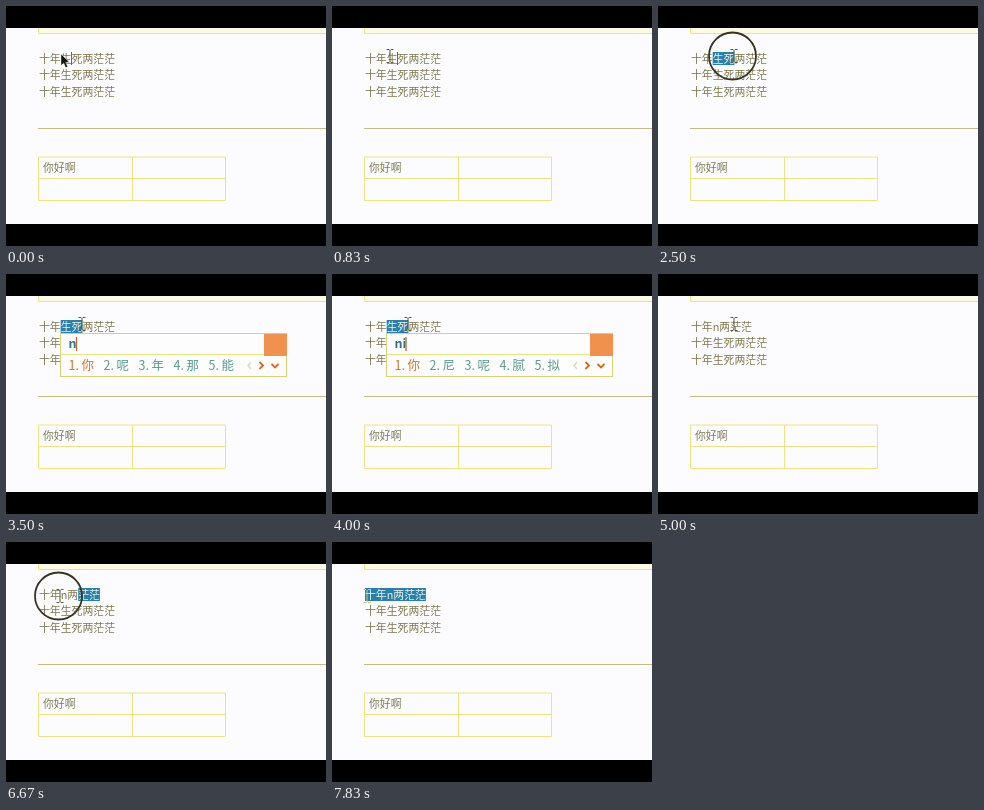
Animation, 320 px wide and 240 px high, one loop 8 s. Source, as an HTML page:

```html
<!DOCTYPE html>
<html lang="zh">
<head>
<meta charset="utf-8">
<title>Text editing</title>
<style>
  html, body { margin: 0; width: 100%; height: 100%; overflow: hidden; background: #000; }
  svg { display: block; width: 100vw; height: 100vh; }
  text { font-family: "Noto Sans CJK SC", "Noto Sans CJK", sans-serif; white-space: pre; }
  .body text { font-size: 10.86px; font-weight: 500; fill: #7d7a50; }
  .rule { fill: none; stroke: #e9e681; }
  .pick { font-size: 12.5px; font-weight: 500; fill: #5a998f; }
  .pick:first-child { fill: #d3702c; }
</style>
</head>
<body>
<svg viewBox="0 0 320 240">
  <defs>
    <clipPath id="selClip"><rect id="clipBox" y="46" height="13"/></clipPath>
  </defs>
  <rect width="320" height="240"/>
  <rect y="22" width="320" height="196" fill="#fcfcfe"/>

  <rect x="32" y="22" width="288" height="5" fill="#fbfae3"/>
  <path class="rule" d="M32.5 22V27.5H320"/>
  <path d="M32 122.5H320" stroke="#bfbe84"/>
  <path class="rule" d="M32.5 151H219.5V194.5H32.5ZM32.5 172.5H219.5M126.5 151V194.5"/>

  <g class="body">
    <text id="line" x="33" y="56.5"></text>
    <text x="33" y="73">十年生死两茫茫</text>
    <text x="33" y="89.5">十年生死两茫茫</text>
    <text x="37" y="165.5">你好啊</text>
    <rect id="sel" y="46" height="13" fill="#2a80ad"/>
    <g clip-path="url(#selClip)"><text id="selLine" x="33" y="56.5" style="fill:#e9f0e6"></text></g>
  </g>
  <path id="caret" d="M0 46V59" stroke="#6f6c42"/>

  <g id="ime">
    <rect x="54.5" y="59.5" width="226" height="43" fill="#fdfdfe" stroke="#d6d27a"/>
    <path class="rule" d="M55 80.5H280"/>
    <text id="typed" x="62.5" y="74" font-size="12.5" font-weight="700" fill="#35708c"></text>
    <path id="typeCaret" d="M0 63V77" stroke="#c4703c" stroke-width="1.4"/>
    <g id="picks"></g>
    <g fill="none" stroke-width="1.8">
      <path d="M245 88l-3 3.5 3 3.5" stroke="#d8d3c4" stroke-width="1.2"/>
      <path d="M253.5 88l3.5 3.5-3.5 3.5M265.5 90l3.5 3.5 3.5-3.5" stroke="#d9681c"/>
    </g>
    <rect x="258" y="60" width="23" height="22" fill="#f0924e"/>
  </g>

  <circle id="ring" r="23.5" fill="none" stroke="#37351f" stroke-width="1.8"/>
  <path id="arrow" d="M0 0V11.5L2.7 9 4.7 13.6 6.7 12.7 4.7 8.3H8.3Z" fill="#14140f" stroke="#f4f4ec" stroke-width=".4"/>
  <path id="beam" d="M-3.5 -6.5H-1L0 -5.5 1 -6.5H3.5M0 -5.5V5.5M-3.5 6.5H-1L0 5.5 1 6.5H3.5" fill="none"/>
</svg>
<script>
const LOOP = 8000, FPS = 6, LEFT = 33, END = 93.9;
const $ = id => document.getElementById(id);
const set = (el, attrs) => { for (const a in attrs) el.setAttribute(a, attrs[a]); };
const show = (id, on) => { $(id).style.display = on ? "" : "none"; };
const within = (k, a, b) => k >= a && k < b;

// Pointer stops: step, x, y
const stops = [
  [0, 55, 48], [3, 58, 50], [10, 58, 50], [11, 55, 49], [14, 76, 50], [35, 76, 50],
  [37, 94, 53], [38, 90, 54], [40, 54, 54], [42, 34, 54], [43, 35, 54], [48, 35, 54]
];
// Selection from step to step, left and right edge
const selections = [
  [12, 14, 54.7, 65.6], [14, 26, 54.7, 76.4],
  [39, 40, 83, END], [40, 41, 72.2, END], [41, 42, 54.7, END], [42, 43, 43.9, END], [43, 48, LEFT, END]
];
// Caret from step to step, x
const carets = [[0, 1, 65], [3, 6, 65], [9, 12, 65], [26, 29, 61], [32, 35, 61]];
const choices = { n: "你呢年那能", ni: "你尼呢腻拟" };

function pointer(k) {
  const i = stops.findIndex((s, n) => k < (stops[n + 1] || [Infinity])[0]);
  const a = stops[i], b = stops[i + 1] || a;
  const p = b === a ? 0 : (k - a[0]) / (b[0] - a[0]);
  return [a[1] + (b[1] - a[1]) * p, a[2] + (b[2] - a[2]) * p];
}

function drawIme(k) {
  const on = within(k, 20, 26);
  show("ime", on);
  if (!on) return;
  const typed = within(k, 22, 25) ? "ni" : "n";
  $("typed").textContent = typed;
  $("typeCaret").setAttribute("transform", `translate(${typed === "ni" ? 74 : 70.5} 0)`);
  $("picks").innerHTML = [...choices[typed]].map((c, i) => {
    const x = 62.5 + i * 35;
    return `<text class="pick" y="95.5"><tspan x="${x}">${i + 1}.</tspan><tspan x="${x + 13}">${c}</tspan></text>`;
  }).join("");
}

function draw(t) {
  const k = Math.floor((t + 5) * FPS / 1000) % (LOOP * FPS / 1000);
  const [x, y] = pointer(k);
  const line = k < 26 ? "十年生死两茫茫" : "十年n两茫茫";
  $("line").textContent = $("selLine").textContent = line;

  const sel = selections.find(s => within(k, s[0], s[1]));
  const box = sel ? { x: sel[2], width: sel[3] - sel[2] } : { x: 0, width: 0 };
  set($("sel"), box);
  set($("clipBox"), box);

  const caret = carets.find(c => within(k, c[0], c[1]));
  show("caret", caret);
  if (caret) $("caret").setAttribute("transform", `translate(${caret[2] + .5} 0)`);

  drawIme(k);

  show("ring", within(k, 11, 16) || within(k, 37, 43));
  set($("ring"), { cx: x - 1.5, cy: y });
  show("arrow", k < 3);
  show("beam", k >= 3);
  const at = `translate(${x} ${y})`;
  set($("arrow"), { transform: at });
  set($("beam"), { transform: at, stroke: k >= 43 ? "#c9c384" : "#5c5936" });
}

function tick() {
  draw(performance.now() % LOOP);
  requestAnimationFrame(tick);
}
tick();
</script>
</body>
</html>
```
